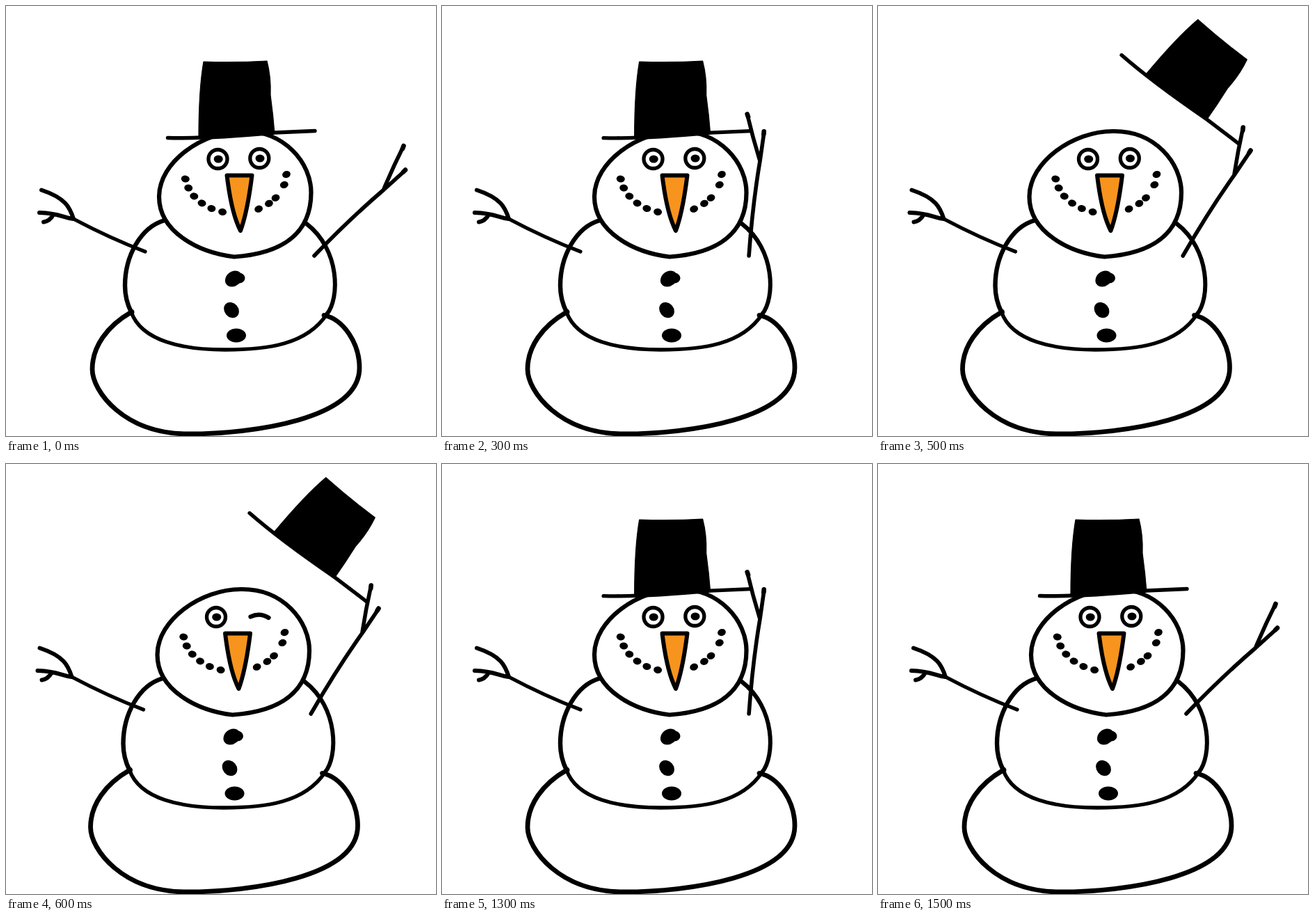
An HTML page that plays this animation: 618x618 px, repeating every 1700 ms.

```html
<!DOCTYPE html>
<html lang="en">
<head>
<meta charset="utf-8">
<title>Snowman tipping his hat</title>
<style>
html, body { margin: 0; width: 100%; height: 100%; overflow: hidden; background: #fff; }
svg { display: block; width: 100%; height: 100%; }
</style>
</head>
<body>
<svg viewBox="0 0 618 618" fill="none" stroke="#000" stroke-linecap="round" stroke-linejoin="round">
  <g id="body"></g>
  <g id="hat"></g>
  <g id="arm"></g>
</svg>
<script>
const $ = id => document.getElementById(id);

const line = (width, d, fill = 'none') => `<path d="${d}" stroke-width="${width}" fill="${fill}"/>`;
const dot = (x, y, rx, ry, turn = 0) =>
  `<ellipse cx="${x}" cy="${y}" rx="${rx}" ry="${ry}" transform="rotate(${turn} ${x} ${y})" fill="#000" stroke="none"/>`;
const eye = (x, y) => `<circle cx="${x}" cy="${y}" r="13.5" stroke-width="5.3"/>` + dot(x + .7, y, 6.5, 5.5);

// Mouth dots sit on an ellipse: six evenly spaced on the left, five looser ones on the right
const smile = [...Array(6).keys()].map(i => 171.5 - 13.3 * i).concat(63, 49, 38, 17, 2).map(deg => {
  const a = deg * Math.PI / 180;
  return dot(330 + 73 * Math.cos(a), 240 + 58 * Math.sin(a), 6, 5, deg > 90 ? 10 : -20);
}).join('');

const bottomBall = line(6.8, 'M180 440C145 460 124 490 124 522S170 615 262 615S508 594 508 520C508 485 485 450 457 444.5');

const middleBall =
  line(6.4, 'M228 308C193 318 171 360 171 402Q171 422 180 440') +
  line(5.3, 'M180 440C195 482 255 494 315 494S432 487 461 443') +
  line(6, 'M461 443C480 420 480 350 432 313') +
  dot(180, 440, 4.5, 4.5);

const head = line(6.2, `M340 180C401 179 438.5 226 438.5 268C438.5 330 393 356 328 360.5
  C275 354 220 324 220 274S283 180 340 180Z`);

const face =
  eye(304.5, 220) +
  `<g id="open">${eye(364.3, 219)}</g>` +
  `<g id="wink">${line(6.2, 'M354 219.5Q367 213 380 221')}</g>` +
  smile +
  line(6, 'M317.5 243.5H353.5Q347 296 337 323Q324 298 317.5 243.5Z', '#f7941e');

const buttons =
  dot(327, 392, 13, 10.5, -40) + dot(335, 391, 8.5, 7.5) +
  dot(324, 437, 12, 10, 50) +
  dot(331, 473.5, 14, 10);

const leftArm =
  line(5.2, 'M200 353Q150 334 97 306') +
  line(6, 'M97 306C92 290 86 276 51 264.5M97 306C80 304 78 298 48 297M68 300Q63 309 54 310.5');

$('body').innerHTML = bottomBall + middleBall + head + face + buttons + leftArm;

$('hat').innerHTML =
  line(1.2, 'M284 80Q330 81.5 375 79Q381 102 380 128Q384 157 386 184L277 189Q277 120 284 80Z', '#000') +
  line(5.4, 'M232.5 189.5Q290 191 386 182L444 179.5');

$('arm').innerHTML =
  line(5.6, 'M443 359Q495 305 543 264L574 236M543 263Q556 232 571.5 201') +
  line(6.6, 'M571 238.5L574 235.5M570 205L571.5 201');

// shift: body, turn: arm, tilt: hat while it is held
const rest  = { shift: 0,    turn: 0 };
const raise = { shift: -.3,  turn: -13.5 };
const grip  = { shift: -1,   turn: -39.8, tilt: 0 };
const lift  = { shift: -2,   turn: -27.6, tilt: 12 };
const greet = { shift: -2.5, turn: -14,   tilt: 39.8 };
const wink  = { ...greet, wink: true };

const LENGTH = 1700;
const steps = [[0, rest], [200, raise], [300, grip], [400, lift], [500, greet], [600, wink],
  [1100, lift], [1300, grip], [1400, raise], [1500, rest]];

const move = (id, transform) => $(id).setAttribute('transform', transform);
const show = (id, on) => $(id).style.display = on ? '' : 'none';

function draw(t) {
  const pose = steps.filter(([from]) => from <= t).pop()[1];
  const { shift, turn, tilt } = pose;
  const shoulder = `translate(${443 + 1.9 * shift} 359) rotate(${turn})`;
  move('body', `translate(${shift} 0)`);
  move('arm', `${shoulder} translate(-443 -359)`);
  // A held hat hangs from the fingers by the end of its brim
  move('hat', tilt === undefined
    ? `translate(${shift} 0)`
    : `${shoulder} translate(118 -134.5) rotate(${tilt - turn}) translate(-446 -180)`);
  show('open', !pose.wink);
  show('wink', pose.wink);
}

const start = performance.now();
function tick() {
  draw((performance.now() - start) % LENGTH);
  requestAnimationFrame(tick);
}
tick();
</script>
</body>
</html>
```
